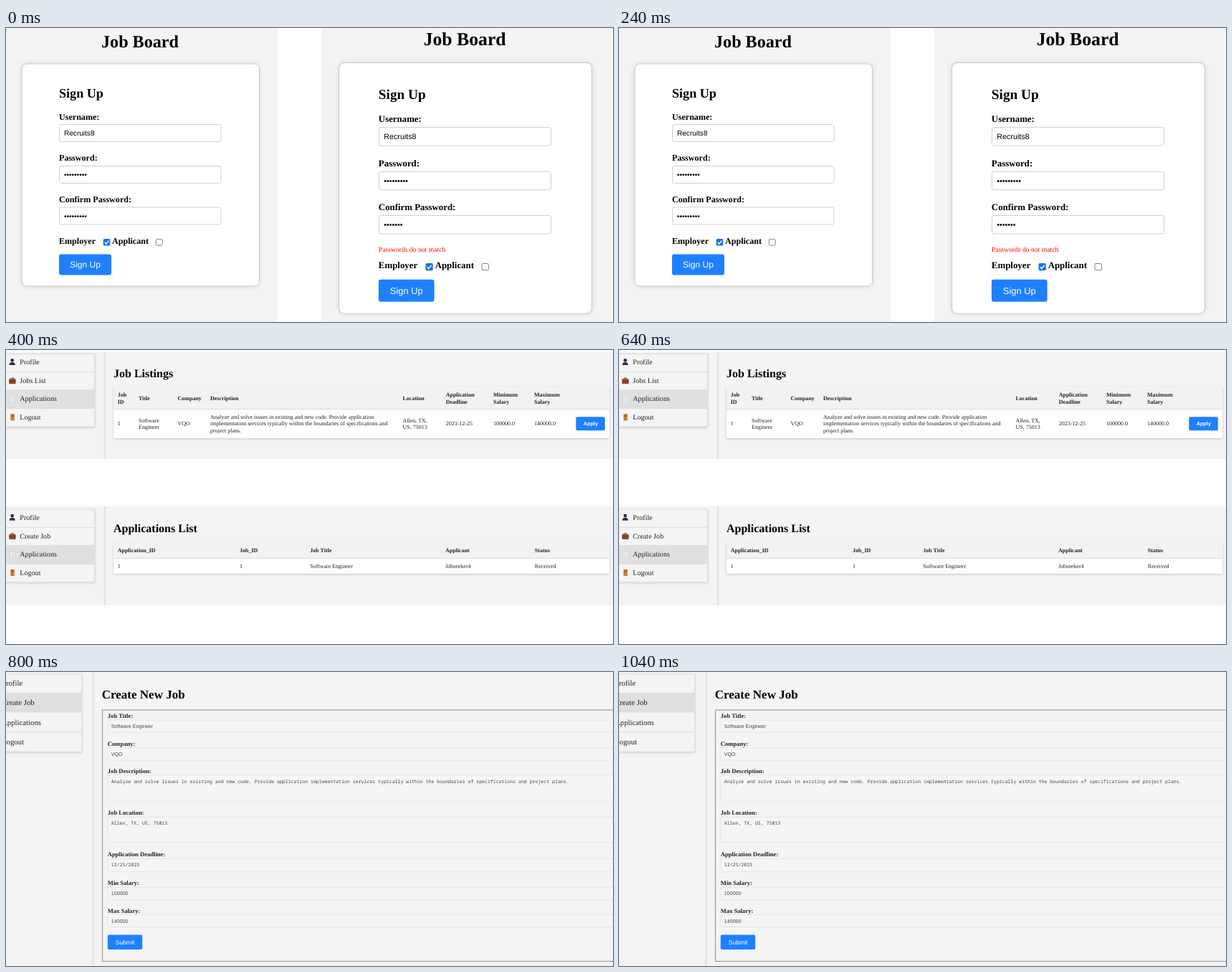
Animation of 847x410 px, one loop 1200 ms. Source, as an HTML page:

```html
<!DOCTYPE html>
<html lang="en">
<head>
<meta charset="utf-8">
<title>Job Board</title>
<style>
  html, body { margin: 0; width: 100%; height: 100%; overflow: hidden; background: #fff; }
  svg { display: block; position: absolute; left: 0; top: 0; }
  text { white-space: pre; text-rendering: geometricPrecision; }
  .serif { font-family: "Liberation Serif", "Times New Roman", serif; }
  .sans { font-family: "Liberation Sans", Arial, sans-serif; }
  .mono { font-family: "Noto Sans Mono", "DejaVu Sans Mono", monospace; }
  .bold { font-weight: bold; }
  .scene { visibility: hidden; }
</style>
</head>
<body>
<svg id="stage" width="847" height="410" viewBox="0 0 847 410">
  <defs>
    <filter id="shadow" x="-10%" y="-20%" width="120%" height="140%">
      <feDropShadow dx="0" dy="0" stdDeviation="3.2" flood-opacity=".13"/>
    </filter>
    <filter id="soft" x="-10%" y="-20%" width="120%" height="140%">
      <feDropShadow dx="0" dy="1" stdDeviation="1.6" flood-opacity=".2"/>
    </filter>
    <linearGradient id="edge">
      <stop offset="0" stop-color="#f4f4f4"/>
      <stop offset=".65" stop-color="#e2e2e2"/>
      <stop offset="1" stop-color="#ececec"/>
    </linearGradient>
  </defs>
</svg>
<script>
const STEP = 400;
const GREY = '#f4f4f4', BLUE = '#1e80ff';

const rect = (x, y, w, h, fill, extra = '') =>
  `<rect x="${x}" y="${y}" width="${w}" height="${h}" fill="${fill}" ${extra}/>`;
const text = (x, y, size, str, cls = 'serif', fill = '#000', extra = '') =>
  `<text x="${x}" y="${y}" font-size="${size}" class="${cls}" fill="${fill}" ${extra}>${str}</text>`;
const bold = (x, y, size, str, fill) => text(x, y, size, str, 'serif bold', fill);
const line = (x, y, w, color) => rect(x, y, w, 1, color);
const group = (content, transform) => `<g transform="${transform}">${content}</g>`;

function field(y, value) {
  return rect(74.5, y + .5, 225.5, 24, '#fff', 'rx="2.5" stroke="#ccc" stroke-width=".9"') +
    text(81, y + 16, 10.07, value, 'sans');
}

function checkbox(x, y, checked) {
  return checked
    ? rect(x, y, 9.6, 9.6, '#1672e8', 'rx="1.7"') +
      `<path d="M${x + 2} ${y + 5}l2 2.1 3.7-4.4" fill="none" stroke="#fff" stroke-width="1.4"/>`
    : rect(x + .4, y + .4, 8.8, 8.8, '#fff', 'rx="1.7" stroke="#767676" stroke-width=".9"');
}

function signUp(confirmDots, error) {
  const drop = error ? 18.5 : 0;
  const dots = n => '•'.repeat(n);
  const choices = bold(74, 301, 12.08, 'Employer') + checkbox(135.7, 294, true) +
    bold(148, 301, 12.08, 'Applicant') + checkbox(209, 294, false) +
    rect(74, 315.5, 73, 29, BLUE, 'rx="3"') + text(89, 334, 12.08, 'Sign Up', 'sans', '#fff');
  return text(187, 27, 24.16, 'Job Board', 'serif bold', '#000', 'text-anchor="middle"') +
    rect(22, 50, 331.5, 310 + drop, '#fff', 'rx="7" stroke="#c8c8c8" filter="url(#shadow)"') +
    bold(74, 97, 18.1, 'Sign Up') +
    bold(74, 127.5, 12.08, 'Username:') + field(134, 'Recruits8') +
    bold(74, 185.3, 12.08, 'Password:') + field(192, dots(9)) +
    bold(74, 243, 12.08, 'Confirm Password:') + field(249.5, dots(confirmDots)) +
    (error ? text(74, 297.3, 9.05, error, 'serif', '#f00') : '') +
    group(choices, `translate(0 ${drop})`);
}

const icons = [
  '<circle cx="8.7" cy="14.3" r="2.4" fill="#3b2b4d"/><path d="M4.6 21q0-4 4.1-4t4.1 4z" fill="#3b2b4d"/>',
  '<path d="M7 40.5v-1.4h3.6v1.4" fill="none" stroke="#5b3423"/>' +
    rect(4.2, 40.3, 9.4, 6.9, '#8d4a2b', 'rx="1"') + rect(4.2, 43, 9.4, .8, '#5b3423'),
  rect(5.6, 64.4, 6.6, 8.4, '#fafcfd', 'stroke="#c3cdd3" stroke-width=".6"') +
    [66.5, 68.5, 70.5].map(y => rect(6.8, y, 4.2, .6, '#9fb0bb')).join(''),
  rect(6.4, 89.3, 5.4, 9, '#c47a35') + rect(7.3, 90.3, 3.6, 3, '#a9642a') +
    '<circle cx="10.7" cy="94.6" r=".6" fill="#f4d060"/>'
].join('');

function sidebar(labels) {
  return rect(-6, 5.5, 129.5, 101.5, GREY, 'stroke="#d8d8d8" stroke-width=".8" filter="url(#soft)"') +
    rect(0, 56, 123.5, 25.5, '#e0e0e0') +
    [30, 55.5, 81].map(y => line(0, y, 123.5, '#dcdcdc')).join('') + icons +
    labels.map((s, i) => text(19.3, 20.2 + i * 25.6, 10.1, s, 'serif', '#222')).join('');
}

function table(y, height, headHeight) {
  return rect(150, y, 692, height, '#fff', 'rx="2" filter="url(#soft)"') +
    rect(150, y, 692, headHeight, '#f2f2f2', 'rx="2"') +
    line(150, y + headHeight, 692, '#dcdcdc');
}

// Lines of one cell, centred vertically on the given baseline.
function cell(x, y, lines, cls) {
  return lines.map((s, i) =>
    text(x, y + (i - (lines.length - 1) / 2) * 9.4, 8, s, cls, '#222')).join('');
}

function columns(list, headY, rowY) {
  return list.map(([x, head, row]) =>
    cell(x, headY, head.split('|'), 'serif bold') + cell(x, rowY, row.split('|'), 'serif')).join('');
}

function listings() {
  const jobs = [
    [155.7, 'Job|ID', '1'],
    [185, 'Title', 'Software|Engineer'],
    [239.5, 'Company', 'VQO'],
    [285, 'Description', 'Analyze and solve issues in existing and new code. Provide application|' +
      'implementation services typically within the boundaries of specifications and|project plans.'],
    [553.5, 'Location', 'Allen, TX,|US, 75013'],
    [613.7, 'Application|Deadline', '2023-12-25'],
    [680, 'Minimum|Salary', '100000.0'],
    [737, 'Maximum|Salary', '140000.0']
  ];
  const applications = [
    [155.7, 'Application_ID', '1'],
    [326, 'Job_ID', '1'],
    [424.3, 'Job Title', 'Software Engineer'],
    [613, 'Applicant', 'Jobseeker4'],
    [737.8, 'Status', 'Received']
  ];
  const edge = (y, h) => rect(135.5, y, 4, h, 'url(#edge)');
  return rect(0, 0, 847, 410, '#fff') +
    rect(0, 3, 847, 149, GREY) + edge(3, 149) +
    sidebar(['Profile', 'Jobs List', 'Applications', 'Logout']) +
    bold(150, 37.5, 16, 'Job Listings') +
    table(51, 72, 31) + columns(jobs, 69.8, 105.4) +
    rect(795.3, 93.3, 40.5, 19, BLUE, 'rx="2"') +
    text(805.7, 105.3, 7.3, 'Apply', 'sans bold', '#fff') +
    rect(0, 218, 847, 138, GREY) + edge(218, 138) +
    group(sidebar(['Profile', 'Create Job', 'Applications', 'Logout']), 'translate(0 216.8)') +
    bold(150, 254.3, 16, 'Applications List') +
    table(268.5, 43.5, 21.5) + columns(applications, 282.2, 304);
}

function createJob() {
  const rows = [
    [64, 'Job Title:', 17, 'Software Engineer', 'sans'],
    [102.6, 'Company:', 17.5, 'VQO', 'sans'],
    [140.7, 'Job Description:', 35, 'Analyze and solve issues in existing and new code. Provide application ' +
      'implementation services typically within the boundaries of specifications and project plans.', 'mono'],
    [199.2, 'Job Location:', 35, 'Allen, TX, US, 75013', 'mono'],
    [257.4, 'Application Deadline:', 18, '12/25/2023', 'mono'],
    [297.4, 'Min Salary:', 17.5, '100000', 'sans'],
    [335.5, 'Max Salary:', 17, '140000', 'sans']
  ];
  const menu = ['Profile', 'Create Job', 'Applications', 'Logout'];
  return rect(0, 0, 847, 410, GREY) +
    rect(-6, 3, 111.5, 108, GREY, 'stroke="#dcdcdc" stroke-width=".8" filter="url(#soft)"') +
    rect(0, 29.5, 105, 27, '#dfdfdf') + line(0, 29, 105, '#dcdcdc') + line(0, 83.5, 105, '#dcdcdc') +
    menu.map((s, i) => text(-6, 19 + i * 27.25, 10.75, s, 'serif', '#222')).join('') +
    rect(119, 0, 4.5, 410, 'url(#edge)') +
    bold(133.8, 37, 17, 'Create New Job') +
    rect(134.6, 53, 730, 350.4, 'none', 'stroke="#8c8c8c"') +
    rows.map(([y, label, h, value, font]) =>
      bold(141.8, y, 8.6, label, '#222') +
      rect(142, y + 3, 730, h, '#f5f5f5', 'rx="1.5" stroke="#e2e2e2" stroke-width=".8"') +
      text(146.8, y + 14, font === 'sans' ? 7.1 : 6.54, value, font, '#444')).join('') +
    rect(141.8, 366.5, 48.4, 20.5, BLUE, 'rx="2"') +
    text(152.7, 379.7, 8.6, 'Submit', 'sans', '#fff');
}

function signUpPair() {
  return rect(0, 0, 847, 410, '#fff') + rect(0, 0, 379, 410, GREY) + rect(440, 0, 405, 410, GREY) +
    signUp(9) +
    group(signUp(7, 'Passwords do not match'), 'translate(441.1 -4.7) scale(1.0645)');
}

const scenes = [signUpPair(), listings(), createJob()];
const stage = document.getElementById('stage');
stage.insertAdjacentHTML('beforeend', scenes.map(s => `<g class="scene">${s}</g>`).join(''));

stage.querySelectorAll('.scene').forEach((scene, i) => {
  const show = n => n === i ? 'visible' : 'hidden';
  const frames = [0, 1, 2].map(n => ({ visibility: show(n), offset: n / 3, easing: 'step-end' }));
  frames.push({ visibility: show(2), offset: 1 });
  scene.animate(frames, { duration: STEP * scenes.length, iterations: Infinity });
});
</script>
</body>
</html>
```
